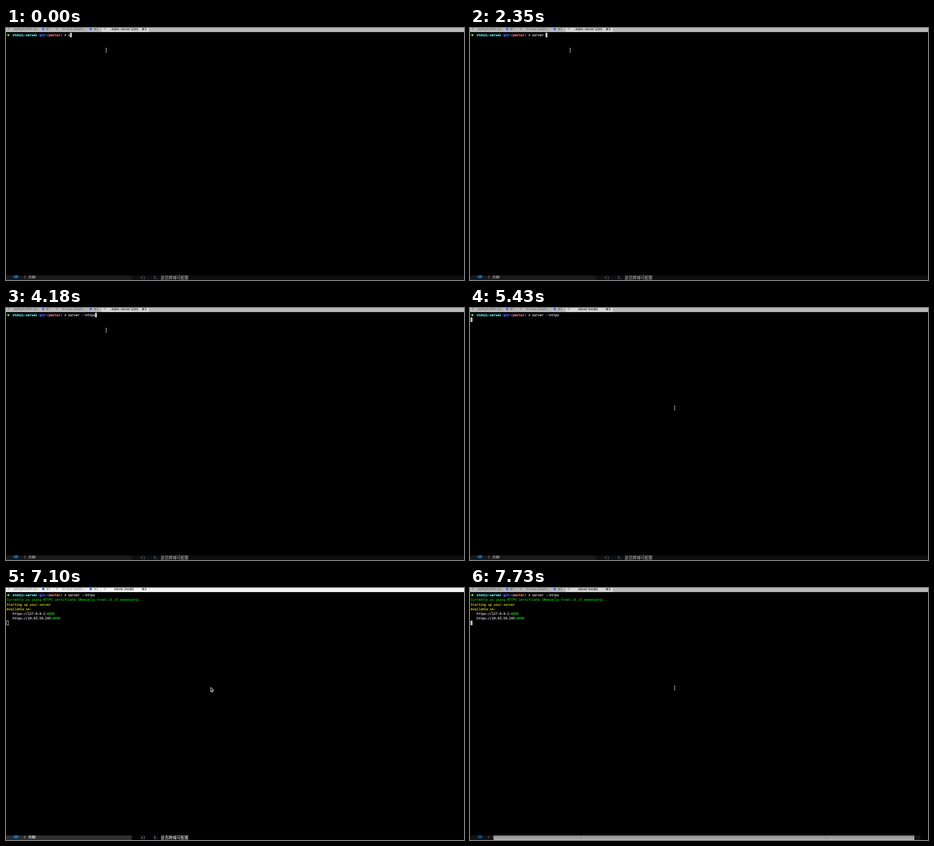
Write an HTML page with a canvas that moves like this. It is 1008x555 px and loops after 8000 ms.

```html
<!DOCTYPE html>
<html lang="zh">
<head>
<meta charset="utf-8">
<title>static-server</title>
<style>
  html, body { margin: 0; width: 100%; height: 100%; overflow: hidden; background: #000; }
  canvas { display: block; }
</style>
</head>
<body>
<canvas id="stage" width="1008" height="555"></canvas>
<script>
const ctx = document.getElementById('stage').getContext('2d');
const LOOP = 8000;
const MONO = '"DejaVu Sans Mono", monospace';
const UI = 'Inter, "DejaVu Sans", sans-serif';
const CJK = '"Noto Sans CJK SC", "Noto Sans CJK", sans-serif';
const CELL = 4.23, ROW = 10.25, LEFT = 1.5, TOP = 10.5;
const COMMAND = 'server --https';
const PROMPT_COLS = 32;

const ENTER = 4510, RENAME = 4660, OUTPUT = 6930, BLUR = 7100, FOCUS = 7400, SETTLE = 7730;

// [time, number of typed characters]
const TYPING = [[0, 1], [140, 2], [410, 3], [700, 4], [1150, 6], [2350, 7], [2500, 8],
  [2800, 9], [3250, 10], [3550, 11], [3700, 12], [3880, 13], [4180, 14]];
const POINTER = [[0, 220, 49], [5290, 408, 174], [5430, 450, 220]];

const GREEN = '#00c800', YELLOW = '#cdca00', WHITE = '#d4d4d4';
const PROMPT = [[3, 'static-server', '#60fdff'], [17, 'git:(', '#6871ff'],
  [22, 'master', '#ff6d67'], [28, ')', '#6871ff'], [30, '✗', '#fefb67']];
const LOG = [
  [[0, 'Currently is using HTTPS certificate (Manually trust it if necessary)', GREEN]],
  [[0, 'Starting up your server', YELLOW]],
  [[0, 'Available on:', YELLOW]],
  [[3, 'https://127.0.0.1:', WHITE], [21, '8080', GREEN]],
  [[3, 'https://10.63.59.245:', WHITE], [24, '8080', GREEN]]
];

const latest = (steps, t) => steps.filter(s => s[0] <= t).pop();

function rect(x, y, w, h, color) {
  ctx.fillStyle = color;
  ctx.fillRect(x, y, w, h);
}

function disc(x, y, r, color) {
  ctx.fillStyle = color;
  ctx.beginPath();
  ctx.arc(x, y, r, 0, Math.PI * 2);
  ctx.fill();
}

function path(points, color, width) {
  ctx.beginPath();
  points.forEach(([x, y], i) => i ? ctx.lineTo(x, y) : ctx.moveTo(x, y));
  ctx.strokeStyle = color;
  ctx.lineWidth = width;
  ctx.stroke();
}

function label(text, x, y, font, color, align = 'left', weight = 0) {
  ctx.font = font;
  ctx.fillStyle = color;
  ctx.textAlign = align;
  ctx.fillText(text, x, y);
  if (!weight) return;
  ctx.strokeStyle = color;
  ctx.lineWidth = weight;
  ctx.strokeText(text, x, y);
}

function cells(row, [col, text, color], weight = '') {
  [...text].forEach((c, i) => label(c, LEFT + (col + i) * CELL, TOP + row * ROW + 7.6,
    `${weight} 7.03px ${MONO}`, color, 'left', 0.28));
}

function closeMark(x, color) {
  path([[x - 2.3, -0.3], [x + 2.3, 4.3]], color, 0.7);
  path([[x + 2.3, -0.3], [x - 2.3, 4.3]], color, 0.7);
}

function tabBar(t, active) {
  const dim = active ? '#555' : '#777';
  const line = active ? '#9c9c9c' : '#d4d4d4';
  rect(0, 0, 1008, 9, active ? '#b9b9b9' : '#f3f3f3');
  rect(209, 0, 106, 9, active ? '#d6d6d6' : '#f6f6f6');
  for (const x of [104, 209, 315]) rect(x, 0, 0.8, 9, line);
  for (const x of [6, 112, 217.5]) closeMark(x, dim);

  const small = `6.5px ${UI}`, bold = `500 6.7px ${UI}`;
  label('..lieimgihokhfn (zs...', 13, 4.5, small, dim);
  label('..fe-mos-assets (...', 120, 4.5, small, dim);
  for (const x of [82, 186.5]) disc(x, 2.2, 2.7, '#3d70f5');
  label('⌘1', 88, 4.5, small, dim);
  label('⌘2', 193, 4.5, small, dim);
  const title = t < ENTER ? '..static-server (zsh)' : t < RENAME ? 'server (zsh)' : 'server (node)';
  label(title, 259.7, 4.5, bold, '#111', 'center');
  label('⌘3', 298.5, 4.5, bold, '#111');
}

function block(col, row, solid) {
  const x = LEFT + col * CELL, y = TOP + row * ROW;
  if (solid) return rect(x - 0.3, y, 4.3, 10, '#c7c7c7');
  ctx.strokeStyle = '#c7c7c7';
  ctx.lineWidth = 1;
  ctx.strokeRect(1.5, Math.round(y) + 0.5, 4, 9);
}

function promptArrow() {
  path([[1.8, 15.6], [5.5, 15.6]], '#5ff967', 1.8);
  path([[4.8, 12.6], [8.2, 15.6], [4.8, 18.6], [4.8, 12.6]], '#5ff967', 0.2);
  ctx.fillStyle = '#5ff967';
  ctx.fill();
}

function terminal(t, active) {
  const typed = latest(TYPING, t)[1];
  promptArrow();
  PROMPT.forEach(run => cells(0, run, 'bold'));
  cells(0, [PROMPT_COLS, COMMAND.slice(0, typed), WHITE]);
  if (t >= OUTPUT) LOG.forEach((line, i) => line.forEach(run => cells(i + 1, run)));
  if (t < ENTER) block(PROMPT_COLS + typed, 0, true);
  else block(0, t < OUTPUT ? 1 : 6, active);
}

function editorStrip(t, active) {
  ctx.save();
  ctx.beginPath();
  ctx.rect(0, 545, 1008, 10);
  ctx.clip();
  rect(0, 545, 1008, 10, active ? '#0e0e0e' : '#020202');
  rect(0, 545, 277, 10, active ? '#1b1b1b' : '#303030');
  rect(0, 545, 34, 10, active ? '#191919' : '#2c2c2c');
  disc(22, 546, 6, active ? '#0d5c9c' : '#0f6ab4');
  label('1', 22, 549, `6px ${UI}`, '#ccc', 'center');
  path([[40, 546.2], [42.6, 548.5], [40, 550.8]], active ? '#aaa' : '#ddd', 1);
  label('大綱', 49, 551.4, `bold 8px ${CJK}`, active ? '#a0a0a0' : '#e0e0e0');
  label('43', 296, 552.5, `8.7px ${MONO}`, active ? '#5c5c5c' : '#8a8a8a');
  label('5.', 325, 552.5, `8.7px ${MONO}`, active ? '#3f78a8' : '#5fa4dc', 'left', 0.2);
  label('是否跨域可配置', 340.5, 552.8, `8.75px ${CJK}`, active ? '#a4a4a4' : '#dedede', 'left', 0.2);
  if (t >= FOCUS) behindWindow(t);
  ctx.restore();
}

function behindWindow(t) {
  const shade = ctx.createLinearGradient(0, 545, 0, 555);
  shade.addColorStop(0, t < SETTLE ? '#929292' : '#888');
  shade.addColorStop(1, t < SETTLE ? '#bebebe' : '#b4b4b4');
  rect(0, 545, 52, 10, 'rgba(0,0,0,.25)');
  rect(978, 545, 30, 10, '#020202');
  rect(978, 545, 13, 10, '#141414');
  rect(52, 545, 926, 10, shade);
  for (const x of [245, 785]) rect(x, 545, 1, 10, '#8c8c8c');
}

function beam(x, y) {
  const stem = x + 0.5;
  path([[stem, y - 4], [stem, y + 4]], '#ddd', 1);
  for (const s of [-1, 1])
    path([[stem - 2, y + s * 4.5], [stem, y + s * 3.8], [stem + 1.5, y + s * 4.5]], '#ddd', 0.9);
}

function arrow(x, y) {
  const shape = [[0, 0], [0, 8.6], [2, 6.8], [3.4, 10], [4.8, 9.4], [3.5, 6.3], [6, 6.2], [0, 0]];
  path(shape.map(([dx, dy]) => [x + dx, y + dy]), '#fff', 1.4);
  ctx.fillStyle = '#000';
  ctx.globalAlpha = 0.6;
  ctx.fill();
  ctx.globalAlpha = 1;
}

function draw(t) {
  const active = t < BLUR || t >= FOCUS;
  rect(0, 0, 1008, 555, '#000');
  tabBar(t, active);
  terminal(t, active);
  editorStrip(t, active);
  if (t >= OUTPUT && t < FOCUS) arrow(450.5, 219);
  else beam(...latest(POINTER, t).slice(1));
}

const start = performance.now();
function tick() {
  draw((performance.now() - start) % LOOP);
  requestAnimationFrame(tick);
}
tick();
</script>
</body>
</html>
```
